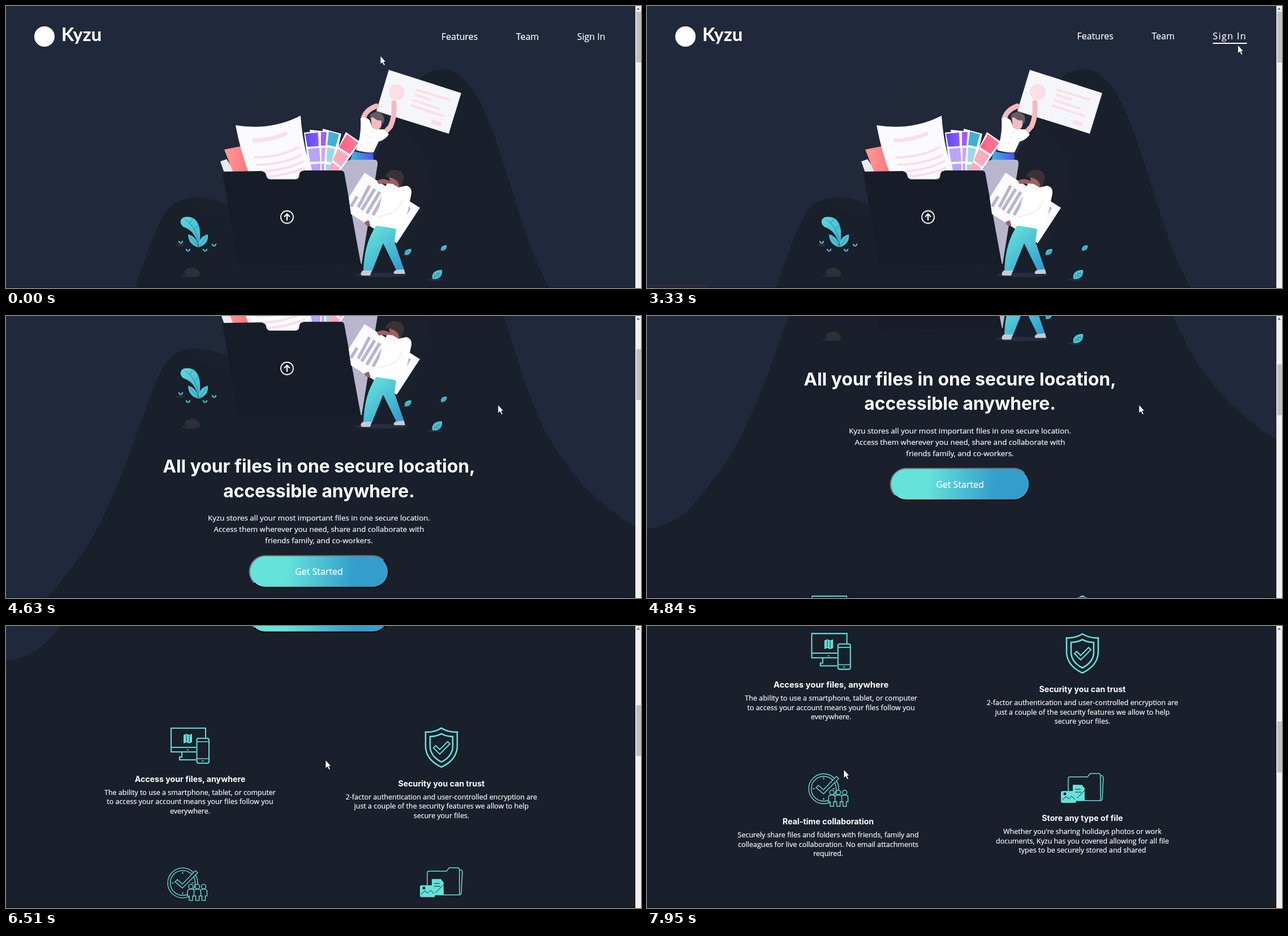
These frames come from a looping animation (1123x499 px, 8 s). An HTML page:

```html
<!DOCTYPE html>
<html lang="en">
<head>
<meta charset="utf-8">
<title>Landing page scroll</title>
<style>
  html, body { margin: 0; width: 100%; height: 100%; overflow: hidden; background: #20283b; }
  svg { display: block; width: 1123px; height: 499px; }
  text { fill: #fff; stroke: #fff; stroke-width: .2; font-family: "Open Sans", sans-serif; }
  .logo { font-family: Lato, sans-serif; font-weight: 700; }
  .title { font-family: Inter, sans-serif; font-weight: 700; stroke: none; }
  .mid { text-anchor: middle; }
  .icon { fill: none; stroke: #65e2d9; stroke-width: 2; }
  .solid { fill: #65e2d9; stroke: none; }
  .pink { fill: none; stroke: #fadfe8; stroke-width: 4; }
  .bars { fill: none; stroke: #b8b6cd; stroke-width: 5.5; }
  .skin { fill: none; stroke: #f5b9bf; stroke-width: 9; stroke-linecap: round; stroke-linejoin: round; }
  .vein { fill: none; stroke: #206f86; stroke-width: .8; }
</style>
</head>
<body>
<svg viewBox="0 0 1123 499">
  <defs>
    <linearGradient id="btn" gradientUnits="userSpaceOnUse" x1="497" y1="726" x2="615" y2="740">
      <stop id="c0"/><stop id="c1" offset="1"/>
    </linearGradient>
    <linearGradient id="leaf" x1="0" y1="0" x2="1" y2="1">
      <stop stop-color="#5fd8de"/><stop offset="1" stop-color="#3fb2d0"/>
    </linearGradient>
    <linearGradient id="pants" x1="0" y1="0" x2=".8" y2="1">
      <stop offset=".2" stop-color="#60dcd8"/><stop offset="1" stop-color="#359fd2"/>
    </linearGradient>
    <linearGradient id="violet"><stop stop-color="#5b45f5"/><stop offset="1" stop-color="#8a5cff"/></linearGradient>
    <linearGradient id="rose"><stop stop-color="#ff5d83"/><stop offset="1" stop-color="#ff7d97"/></linearGradient>
    <linearGradient id="coral"><stop stop-color="#ff9c98"/><stop offset="1" stop-color="#fb7379"/></linearGradient>
    <linearGradient id="jeans"><stop stop-color="#3fb5e2"/><stop offset="1" stop-color="#4a53ea"/></linearGradient>
    <g id="sprig">
      <path fill="#4cc3d5" d="M0 3Q-5 1-4-3Q0-1 0 3Q0-1 4-3Q5 1 0 3Z"/>
    </g>
    <g id="drop">
      <ellipse cx="-4" cy="9" rx="13" ry="2.5" fill="#262d40"/>
      <path fill="url(#leaf)" d="M-8 8C-10-3-2-8 9-8C11 3 3 10-8 8Z"/>
      <path class="vein" d="M-8 8L6-5M-4 4V-2M0 0V-5M-2 3H4M2-1H7"/>
    </g>
  </defs>

  <rect width="1123" height="499" fill="#20283b"/>
  <g id="page">
    <path fill="#191f2b" d="M0 812C50 805 75 780 97 750C128 712 150 685 172 636C198 580 212 545 227 501
      C250 438 262 398 280 368C300 338 335 328 392 352L500 400L610 330C655 275 690 190 718 146
      C735 119 755 112 772 112C815 112 843 172 862 225C888 300 905 365 930 432C965 524 1020 588 1085 636L1113 654V1900H0Z"/>
    <path fill="#242a38" opacity=".13" d="M332 360C370 300 360 220 400 160C440 110 530 120 590 155C650 190 740 210 746 290C750 350 720 400 700 440Z"/>

    <circle cx="68" cy="54" r="18" fill="#fff"/>
    <text class="logo" x="98" y="62" font-size="32.5">Kyzu</text>
    <g id="nav" font-size="16"></g>

    <g id="plants">
      <ellipse cx="327" cy="477" rx="16" ry="3" fill="#262d40"/>
      <path fill="#302f33" d="M316 474Q316 464 323 464Q330 460 338 466Q344 470 343 475Q330 478 316 474Z"/>
      <ellipse cx="308" cy="423" rx="8" ry="2" fill="#302f33"/>
      <path fill="url(#leaf)" d="M341 427C347 396 342 373 320 373C308 373 305 384 314 391C328 396 336 405 341 427Z"/>
      <path fill="#4cc3d5" d="M340 427Q322 422 322 404Q338 408 340 427ZM341 427Q339 409 357 404Q359 421 341 427Z"/>
      <path class="vein" d="M341 424Q338 391 317 378M334 394L341 388M325 384L330 377M339 425L326 409M342 425L354 409"/>
      <use href="#sprig" x="309" y="418"/><use href="#sprig" x="322" y="432"/>
      <use href="#sprig" x="352" y="432"/><use href="#sprig" x="368" y="423"/>
      <use href="#drop" transform="translate(762 475)"/>
      <use href="#drop" transform="translate(710.5 435) scale(.66)"/>
      <use href="#drop" transform="translate(774 428) scale(.58)"/>
    </g>

    <g id="folder">
      <path fill="#b8b6cd" d="M590 278L610 272H652Q658 272 657 281L629 456H622Z"/>
      <path fill="#e9ebf2" d="M379 275L390 271L406 295H386Z"/>
      <path fill="url(#coral)" d="M386 254L416 248L432 295H402Z"/>
      <path fill="#f8f8fd" d="M527 224L552 221L560 295H536ZM537 219L568 222L564 295H552ZM560 217L593 226L578 295H560ZM601 223L627 241L588 296H565Z"/>
      <path fill="url(#violet)" d="M529 226L552 224L553 248L533 249Z"/>
      <path fill="#9c5cff" d="M557 223H567L565 247H557Z"/>
      <path fill="#3fb0d3" d="M571 222L589 227L583 249L568 246Z"/>
      <path fill="url(#rose)" d="M603 227L623 242L608 262L589 250Z"/>
      <path fill="#b7a4fb" d="M534 253L554 251L556 275L538 276ZM539 280L556 279V292H541Z"/>
      <path fill="#c8a5fb" d="M558 251H565L563 275H558ZM558 279H563V292H558Z"/>
      <path fill="#9ad9e4" d="M568 250L582 253L576 277L567 275ZM566 280L575 281L572 292H566Z"/>
      <path fill="#ffa9bd" d="M587 253L606 265L593 284L578 273ZM576 276L591 287L588 292H570Z"/>
      <path fill="#fafaff" d="M406 211Q468 221 521 194Q525 255 546 308H434Q415 260 406 211Z"/>
      <path class="pink" style="stroke-width:7" d="M436 238Q468 238 497 225"/>
      <path class="pink" d="M439 268Q485 268 519 249M443 281Q490 281 523 263M451 293Q495 291 527 274M463 302Q500 299 529 286"/>
      <path fill="#161d28" d="M386 293L453 292Q460 293 461 300Q462 306 468 306H511Q518 306 518 299Q519 291 526 291H592Q598 291 599 297L628 457L411 459L383 297Q382 293 386 293Z"/>
      <path fill="none" stroke="#dcdce8" stroke-width="1.5" d="M453 292Q460 293 461 300Q462 306 468 306H511Q518 306 518 299Q519 291 526 291"/>
      <path fill="none" stroke="#b8b6cd" d="M594 291Q598 291 599 297L628 456"/>
      <g fill="none" stroke="#fff" stroke-width="1.8">
        <circle cx="497" cy="373.500" r="11"/>
        <path stroke-width="2.2" d="M497 379.500V368.500M492 373L497 368L502 373"/>
      </g>
    </g>

    <g id="climber">
      <path fill="#f5f6fa" d="M677 113L805 154L783 226L655 186Z"/>
      <circle cx="691" cy="152.500" r="14" fill="#fadfe8"/>
      <path class="pink" d="M725 148L784 166M723 157L752 166M719 166L767 182M716 176L774 195"/>
      <path fill="#fadfe8" d="M754 201L771 207L769 214L752 208Z"/>
      <path class="skin" d="M632 199Q636 184 655 177M686 171Q688 196 680 213L670 224"/>
      <path fill="url(#jeans)" d="M614 257L649 260L650 272H609Z"/>
      <path fill="none" stroke="#2c2c4c" stroke-width="2" d="M618 257Q635 261 649 259"/>
      <path fill="#fff" d="M627 199Q634 194 643 202L648 215Q660 219 668 218L677 227Q672 236 659 240L650 259Q635 260 619 255Q629 230 627 199Z"/>
      <path fill="#f5b9bf" d="M645 197Q655 191 664 203Q666 218 655 219L647 215Z"/>
      <path fill="#675b62" d="M644 199Q641 191 650 189Q656 185 663 190Q671 195 668 205Q663 214 664 202Q657 204 652 199Q648 195 644 199Z"/>
      <path fill="none" stroke="#999bb0" stroke-dasharray="1.500 9" d="M648 222L634 258"/>
    </g>

    <g id="carrier">
      <ellipse cx="663" cy="476" rx="46" ry="4" fill="#262d40"/>
      <path fill="#fafaff" d="M634 295L732 357L691 420L610 368L606 339Z"/>
      <path class="bars" d="M621 337L610 355M643 318L623 356M652 324L629 361M661 329L638 367M669 334L649 370M714 356L706 369"/>
      <path fill="none" stroke="#9c6063" stroke-width="8" stroke-linecap="round" d="M661 311Q671 308 680 316"/>
      <path fill="url(#pants)" d="M655 388L690 394L687 417L704 467H690L667 420L647 470H632Q633 420 655 388Z"/>
      <path fill="#c9c8d8" d="M631 468H647L644 477H629Q625 473 631 468ZM690 467L704 466L706 474L687 474Q683 471 690 467Z"/>
      <path fill="#9c6063" d="M677 302H701L699 318L690 322L680 316Z"/>
      <path fill="#3c3136" d="M670 303Q674 290 687 290Q703 291 704 303Q702 316 696 320Q694 310 688 307Q678 301 670 303Z"/>
      <path fill="#9c6063" d="M634 383Q640 377 647 381L644 389Q637 391 634 383Z"/>
      <path fill="#fff" d="M674 314L684 315L694 321L708 318Q718 320 717 332L710 365L702 394Q692 397 684 393L644 387L642 380L658 367L666 330Z"/>
      <path fill="none" stroke="#d9dae6" d="M700 344Q696 361 680 367L658 373M677 318L690 325"/>
    </g>

    <g class="mid" font-size="31.8">
      <text class="title" x="553.500" y="558">All your files in one secure location,</text>
      <text class="title" x="553.500" y="601.500">accessible anywhere.</text>
    </g>
    <g class="mid" font-size="13.33">
      <text x="553.500" y="643">Kyzu stores all your most important files in one secure location.</text>
      <text x="553.500" y="663">Access them wherever you need, share and collaborate with</text>
      <text x="553.500" y="683">friends family, and co-workers.</text>
    </g>

    <rect x="431" y="705" width="245" height="56" rx="28" fill="url(#btn)"/>
    <g fill="none" stroke-width="2">
      <path stroke="#6f7278" d="M439 753A28 28 0 0 1 459 705H648A28 28 0 0 1 668 713"/>
      <path stroke="#000" d="M668 713A28 28 0 0 1 648 761H459A28 28 0 0 1 439 753"/>
    </g>
    <text id="start" class="mid" x="553.500" y="739" font-size="16">Get Started</text>

    <g class="icon" id="devices">
      <path d="M336 973H292V931H353V948M292 965H336M311 975V982H307V987H336M311 982V974"/>
      <rect x="337.500" y="949" width="21.500" height="44" rx="3"/>
      <path stroke-width="1.500" d="M338 955H359M338 985H359M346 989H350M320 969.500H323"/>
      <path class="solid" d="M314 943L319 941L324 943L329 941V956L324 958L319 956L314 958Z"/>
      <path style="stroke:#191f2b;stroke-width:1" d="M319 943V955M324 944V956"/>
    </g>
    <g class="icon" style="stroke-width:2.6">
      <path d="M770 931Q757 939 742 938V965Q744 988 770 1000Q796 988 798 965V938Q783 939 770 931Z"/>
      <path d="M770 941Q761 946 750 946V966Q752 982 770 991Q788 982 790 966V946Q779 946 770 941Z"/>
      <path stroke-width="2" d="M756 966L760 962L767 969L781 955L785 959L767 977Z"/>
    </g>
    <g class="icon" style="stroke-width:1.4">
      <circle cx="312.500" cy="1205" r="26.500"/><circle cx="312.500" cy="1205" r="22"/>
      <path d="M312.500 1185V1189M312.500 1221V1225M293 1205H297M328 1205H332"/>
      <path fill="#191f2b" d="M299 1203L303 1199L312 1207L335 1183L339 1187L312 1214Z"/>
      <g id="team" fill="#191f2b"></g>
    </g>
    <g class="icon" style="stroke-width:1.5">
      <path d="M745 1209V1187Q745 1184 748 1184H779L784 1178H798Q802 1178 802 1182V1226H760"/>
      <path d="M802 1182Q807 1181 807 1186L805 1224Q803 1226 802 1226"/>
      <path class="solid" d="M753 1198H769L774 1204V1226H753Z"/>
      <rect class="solid" x="732" y="1209" width="27" height="21" rx="3"/>
      <path style="stroke:#191f2b;stroke-width:1" d="M757 1206H767M757 1211H768M760 1222L774 1208M734 1225L741 1219L746 1223L751 1218L757 1224"/>
      <circle cx="739" cy="1214" r="2.500" fill="#191f2b" stroke="none"/>
    </g>
    <g id="cards"></g>
  </g>

  <rect id="status" y="494" width="106" height="5" fill="#2b303b"/>
  <rect y="497" width="1113" height="2" fill="#10151f" opacity=".45"/>
  <rect x="1113" width="10" height="499" fill="#f1f1f1"/>
  <path d="M1115 6.500L1118 3L1121 6.500Z" fill="#606060"/>
  <rect id="thumb" x="1114.500" width="8.500" height="90" fill="#c1c1c1"/>

  <g id="cursor" stroke="#111" stroke-width=".8">
    <path id="arrow" fill="#fff" d="M0 0V15L3.500 12L6 17.500L8.500 16.400L6 11H10Z"/>
    <path id="hand" fill="#fff" d="M-1 1Q1-1 2 1V7Q4 5.500 5 7.500Q7 6.500 8 8.500Q10.500 7.500 10.500 10V14Q9.500 16 9 19H1Q-1 15-4.500 11.500Q-5 9-2.500 9.500L-1 11Z"/>
  </g>
</svg>
<script>
const $ = id => document.getElementById(id);
const LOOP = 8000, BAR_RATIO = 0.1734;
const clamp = v => Math.min(1, Math.max(0, v));
const smooth = v => v * v * (3 - 2 * v);
const linear = v => v;

// keys: [time, value, value...]; returns the interpolated values
function track(keys, t, ease = smooth) {
  const i = keys.findIndex(k => k[0] > t);
  if (i < 0) return keys.at(-1).slice(1);
  if (i === 0) return keys[0].slice(1);
  const a = keys[i - 1], b = keys[i], p = ease((t - a[0]) / (b[0] - a[0]));
  return a.slice(1).map((v, n) => v + (b[n + 1] - v) * p);
}

// 0..1 level that rises at `on` and falls at `off`
const hover = (t, on, off, ms = 300) => smooth(clamp((t - on) / ms)) * (1 - smooth(clamp((t - off) / ms)));

const scrollKeys = [[4020, 0], [4160, 136], [4280, 235], [4370, 280], [4630, 280], [4840, 435], [4980, 485],
  [5080, 501], [6130, 501], [6230, 570], [6300, 610], [6510, 750], [6620, 790], [7120, 790], [7300, 870], [7460, 917]];
const cursorKeys = [[460, 662, 88], [850, 735, 95], [1230, 800, 60], [1770, 800, 60], [2270, 920, 60], [2580, 920, 60],
  [3000, 1040, 60], [3230, 1043, 62], [3330, 1045, 69], [3800, 870, 157], [4950, 870, 157], [5600, 597, 252],
  [6130, 597, 252], [6510, 565, 237], [6990, 400, 130], [7250, 330, 130], [7620, 335, 150], [7880, 348, 254]];
const handTimes = [[1080, 1900], [2140, 2700], [2880, 3280], [5420, 6180]];

const links = [
  { label: "Features", x: 770, w: 65, grow: 12, on: 1110, off: 1830 },
  { label: "Team", x: 902, w: 41, grow: 6, on: 2170, off: 2660 },
  { label: "Sign In", x: 1010, w: 50, grow: 10.5, on: 2840, off: 3340 }
];
$("nav").innerHTML = links.map(l => `<text>${l.label}</text><rect height="2" fill="#fff"/>`).join("");
links.forEach((l, i) => [l.text, l.line] = [$("nav").children[i * 2], $("nav").children[i * 2 + 1]]);

const cards = [
  [325.5, 1026, "Access your files, anywhere", "The ability to use a smartphone, tablet, or computer",
    "to access your account means your files follow you", "everywhere."],
  [770, 1034, "Security you can trust", "2-factor authentication and user-controlled encryption are",
    "just a couple of the security features we allow to help", "secure your files."],
  [320.5, 1268, "Real-time collaboration", "Securely share files and folders with friends, family and",
    "colleagues for live collaboration. No email attachments", "required."],
  [770, 1262, "Store any type of file", "Whether you're sharing holidays photos or work",
    "documents, Kyzu has you covered allowing for all file", "types to be securely stored and shared"]
];
$("cards").innerHTML = cards.map(([x, y, title, ...lines]) =>
  `<g class="mid"><text class="title" x="${x}" y="${y}" font-size="14.2">${title}</text><g font-size="12.5">` +
  lines.map((s, i) => `<text x="${x}" y="${y + 23 + i * 16.67}">${s}</text>`).join("") + "</g></g>").join("");

$("team").innerHTML = [327, 349.5, 338.5].map(x =>
  `<circle cx="${x}" cy="1211.500" r="4"/><path d="M${x - 6} 1228V1220Q${x - 6} 1216 ${x} 1216Q${x + 6} 1216 ${x + 6} 1220V1228H${x + 3}V1236H${x - 3}V1228Z"/>`).join("");

const zoom = (el, x, y, k) => el.setAttribute("transform", `translate(${x} ${y}) scale(${k}) translate(${-x} ${-y})`);
const lit = (rgb, k) => `rgb(${rgb.map(c => Math.min(255, c * k)).join()})`;

function draw(t) {
  const [scroll] = track(scrollKeys, t, linear);
  $("page").setAttribute("transform", `translate(0 ${-scroll})`);
  $("thumb").setAttribute("y", 10 + scroll * BAR_RATIO);

  const levels = links.map(l => hover(t, l.on, l.off));
  const any = Math.max(...levels);
  let shift = 0;
  for (let i = links.length - 1; i >= 0; i--) {
    const l = links[i], h = levels[i];
    shift += l.grow * h * (i === 2 ? 0.9 : 1);
    const x = l.x - shift;
    l.text.setAttribute("x", x);
    l.text.setAttribute("y", 60 - any);
    l.text.setAttribute("letter-spacing", 1.45 * h);
    l.line.setAttribute("x", x);
    l.line.setAttribute("y", 65);
    l.line.setAttribute("width", l.w + l.grow * h);
    l.line.setAttribute("opacity", h);
  }
  $("status").setAttribute("opacity", t > 1150 && t < 3700 ? 1 : 0);

  const lift = hover(t, 5400, 6160, 200), glow = 1 + 0.3 * lift;
  $("c0").setAttribute("stop-color", lit([101, 226, 217], glow));
  $("c1").setAttribute("stop-color", lit([51, 158, 204], glow));
  $("start").style.strokeWidth = 0.2 + 0.4 * lift;

  const grow = hover(t, 7180, 8200);
  const [title, copy] = $("cards").firstChild.children;
  zoom(title, 325.5, 1020, 1 + 0.04 * grow);
  zoom(copy, 325.5, 1061, 1 + 0.007 * grow);
  zoom($("devices"), 325.5, 962, 1 + 0.02 * grow);

  const [cx, cy] = track(cursorKeys, t);
  const hand = handTimes.some(([a, b]) => t >= a && t < b);
  $("cursor").setAttribute("transform", `translate(${cx} ${cy})`);
  $("arrow").style.display = hand ? "none" : "";
  $("hand").style.display = hand ? "" : "none";
}

const start = performance.now();
function tick() {
  draw((performance.now() - start) % LOOP);
  requestAnimationFrame(tick);
}
tick();
</script>
</body>
</html>
```
